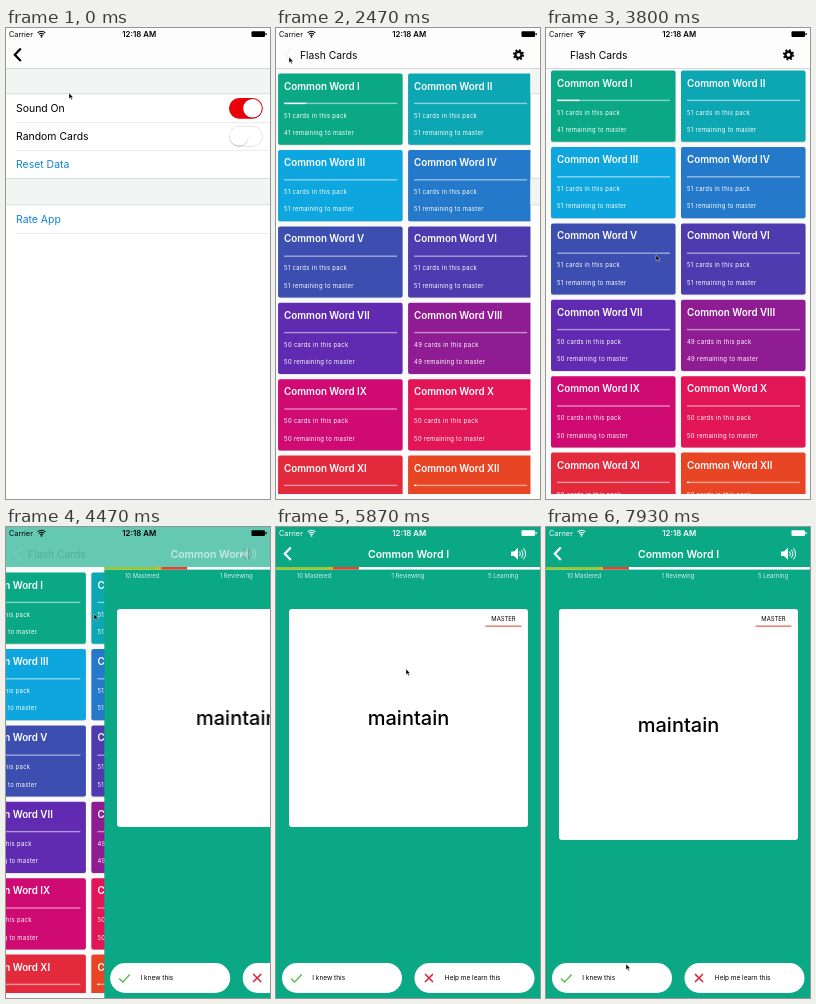
Recreate the animation shown at these times as an HTML page. Size 264 by 471 pixels, loop 8000 ms.

```html
<!DOCTYPE html>
<html lang="en">
<head>
<meta charset="utf-8">
<title>Flash cards</title>
<style>
html, body { margin: 0; width: 100%; height: 100%; overflow: hidden; background: #fff; }
#stage { position: relative; width: 264px; height: 471px; overflow: hidden; }
#stage svg { display: block; font-family: Inter, "Open Sans", sans-serif; }
.layer { position: absolute; left: 0; top: 0; width: 264px; height: 471px; }
#flip { perspective: 784px; perspective-origin: 132px 239px; }
.card { position: absolute; left: 12.5px; top: 82px; width: 239px; background: #fff; border-radius: 3px; overflow: hidden; }
.serif { font-family: "Liberation Serif", "Noto Serif", serif; }
</style>
</head>
<body>
<div id="stage">
  <svg class="layer" id="list"></svg>
  <svg class="layer" id="settings"></svg>
  <div class="layer" id="detail">
    <svg class="layer" id="study"></svg>
    <div class="layer" id="flip">
      <div class="card" id="front"><svg id="frontArt" width="239" height="231"></svg></div>
      <div class="card" id="back" style="height:67.5px"><svg id="backArt" width="239" height="68"></svg></div>
    </div>
  </div>
  <svg class="layer" id="nav"></svg>
  <svg class="layer" id="pointer"></svg>
</div>
<script>
const $ = id => document.getElementById(id);
const LOOP = 8000, GREEN = [11, 168, 134];

// Markup helpers; text is placed by its left (or anchor) and cap-height centre.
const text = (x, y, size, str, attrs = '') =>
  `<text x="${x}" y="${y + size * .364}" font-size="${size}" ${attrs}>${str}</text>`;
const rect = (x, y, w, h, fill, attrs = '') =>
  `<rect x="${x}" y="${y}" width="${w}" height="${h}" fill="${fill}" ${attrs}/>`;
const line = (d, color, width, attrs = '') =>
  `<path d="${d}" fill="none" stroke="${color}" stroke-width="${width}" ${attrs}/>`;
const MID = 'text-anchor="middle"';

function buildList() {
  const packs = [
    ['I', 51, 10, '#0ba886'], ['II', 51, 0, '#0ca7b3'], ['III', 51, 0, '#0ea6de'], ['IV', 51, 0, '#2579cb'],
    ['V', 51, 0, '#3c4eb0'], ['VI', 51, 0, '#4e3bb0'], ['VII', 50, 0, '#602bb0'], ['VIII', 49, 0, '#901c94'],
    ['IX', 50, 0, '#cf0a72'], ['X', 50, 0, '#e21556'], ['XI', 50, 0, '#e32a3c'], ['XII', 50, 1, '#e84524']
  ];
  const small = 'fill="#fff" letter-spacing=".31"';
  const cards = packs.map(([num, total, done, color], i) => {
    const x = i % 2 ? 135 : 5, y = 45.6 + 76.4 * (i >> 1);
    return rect(x, y + .6, 124.5, 71.2, '#000', 'rx="2" opacity=".15"') +
      rect(x, y, 124.5, 71.2, color, 'rx="2"') +
      text(x + 6, y + 12.4, 9.8, 'Common Word ' + num, 'font-weight="600" fill="#fff"') +
      rect(x + 6, y + 29.1, 113, 1.4, '#fff', 'opacity=".5"') +
      rect(x + 6, y + 29.1, 113 * done / total, 1.4, '#fff') +
      text(x + 6, y + 41.9, 5.9, total + ' cards in this pack', small) +
      text(x + 6, y + 59.3, 5.9, total - done + ' remaining to master', small);
  });
  $('list').innerHTML = rect(0, 40, 264, 431, '#fafafa') + `<g id="packs">${cards.join('')}</g>` +
    rect(0, 466, 264, 5, '#fafafa');
}

function toggle(y, id) {
  return rect(223.5, y - 10, 33, 20, '#fff', 'rx="10" stroke="#e4e4e4"') +
    rect(223, y - 10.4, 33.8, 20.8, '#ea0008', `rx="10.4" id="${id}Fill"`) +
    `<g id="${id}Knob"><circle cy="${y + 1}" r="9.4" opacity=".18"/><circle cy="${y}" r="9.3" fill="#fff"/></g>`;
}

function buildSettings() {
  const rule = (y, x = 10) => rect(x, y, 264 - x, .7, x ? '#e6e6e8' : '#cfcfd2');
  const label = (y, str, fill = '#000') => text(10, y, 10.45, str, `fill="${fill}"`);
  $('settings').innerHTML = rect(0, 40, 264, 431, '#fff') +
    rect(0, 40, 264, 26, '#f3f5f5') + rect(0, 150.5, 264, 26, '#f3f5f5') +
    rule(65.5, 0) + rule(94) + rule(122) + rule(150.3, 0) + rule(176.5, 0) + rule(205) +
    label(80, 'Sound On') + label(108, 'Random Cards') +
    label(136.5, 'Reset Data', '#1283d8') + label(191, 'Rate App', '#1283d8') +
    toggle(80.3, 'sound') + toggle(108.3, 'random');
}

function buildDetail() {
  const stat = (x, str) => text(x, 49, 6, str, `${MID} fill="#fff" opacity=".8"`);
  const button = (x, icon, str) => rect(x, 436, 120, 30, '#fff', 'rx="15"') + icon +
    text(x + 30.3, 451, 6.5, str);
  $('study').innerHTML = rect(0, 40, 264, 431, `rgb(${GREEN})`) +
    rect(0, 40, 264, 2.6, '#fff') + rect(0, 40, 57, 2.6, '#9ac531') +
    rect(52, 40, 5, 2.6, '#d6b72b') + rect(57, 40, 26, 2.6, '#e0452f') +
    stat(38, '10 Mastered') + stat(132, '1 Reviewing') + stat(227, '5 Learning') +
    button(6, line('M15 451.5l3.6 3.6 7-7.6', '#58b947', 1.4), 'I knew this') +
    button(138.5, line('M149 447l8 8m0-8l-8 8', '#d92440', 1.6), 'Help me learn this');

  const badge = (y, color) => text(214.5, y, 5.9, 'MASTER', MID) + rect(196.5, y + 6.5, 36, 1.4, color);
  $('frontArt').innerHTML = badge(10, '#ea7468') + `<g id="word">${text(119.5, 0, 20, 'maintain', MID + ' font-weight="500"')}</g>`;
  const serif = (y, str) => text(6.8, y, 7.7, str, 'class="serif"');
  $('backArt').innerHTML = badge(7.5, '#c9a24a') + text(6, 14.5, 10.4, 'maintain', 'font-weight="600"') +
    serif(33.5, '<tspan font-weight="700">verb:</tspan> to assert') +
    serif(46.5, 'The scientist <tspan font-weight="700">maintained</tspan> that the extinction of dinosaurs was most likely') +
    serif(56.5, 'brought about by a drastic change in climate.');
}

function buildNav() {
  const ring = 1.846;
  const chevron = id => line('M14.8 20.5L8.8 26.8l6 6.3', 'currentColor', 2.2, `id="${id}"`);
  const wave = r => `M${35.5 - r * .72} ${8.8 - r * .72}a${r} ${r} 0 0 1 ${r * 1.44} 0`;
  $('nav').innerHTML = rect(0, 0, 264, 40, '#fff', 'id="bar"') + rect(0, 40, 264, .7, '#c9c9cc', 'id="barRule"') +
    `<g id="status">${text(3, 6.2, 7.3, 'Carrier')}${text(133.2, 6.2, 7.8, '12:18 AM', MID + ' font-weight="600"')}
      ${[1.6, 3.5, 5.4].map(r => line(wave(r), 'currentColor', 1.1)).join('')}<circle cx="35.5" cy="8.9" r=".8"/>
      ${rect(245.5, 3.2, 13.5, 5.8, 'currentColor', 'rx="1"')}${rect(259.5, 5, 1.2, 2.2, 'currentColor')}</g>
    ${chevron('backDark')}
    <g id="listNav">${text(24, 27, 10.3, 'Flash Cards')}
      <circle cx="242.5" cy="26.8" r="4.7" fill="none" stroke="#000" stroke-width="1.9" stroke-dasharray="${ring}"/>
      <circle cx="242.5" cy="26.8" r="3.1" fill="none" stroke="#000" stroke-width="2.4"/></g>
    <g color="#fff" fill="#fff">${chevron('backLight')}
      <clipPath id="titleArea"><path d="M30 14h206v26H30z"/></clipPath>
      <g clip-path="url(#titleArea)"><g id="title">${text(132.5, 27, 10.5, 'Common Word I', MID + ' font-weight="600"')}</g></g>
      <g id="speaker"><path d="M235 24.5h3l4-3.7v12l-4-3.7h-3z"/>
      ${line('M243.6 24.5q1.6 2.3 0 4.6M245.5 22.8q3 4 0 8M247.5 21.2q4.2 5.6 0 11.2', '#fff', 1)}</g></g>`;
  $('pointer').innerHTML = '<path id="arrow" d="M0 0v5.8l1.4-1.2 1 2.2 1-.5-1-2.1h1.8z" stroke="#fff" stroke-width=".4"/>';
}

buildList();
buildSettings();
buildDetail();
buildNav();

const clamp = v => Math.min(1, Math.max(0, v));
const span = (t, start, length) => clamp((t - start) / length);
const smooth = p => p * p * (3 - 2 * p);
const easeOut = p => 1 - (1 - p) ** 4;
const mix = (a, b, p) => a + (b - a) * p;

// Pointer stops: time, x, y
const stops = [
  [70, 63, 65], [820, 234, 106], [1150, 234, 106], [1730, 13, 29], [2850, 13, 29],
  [3200, 110, 230], [3250, 110, 230], [3500, 110, 200], [3600, 110, 200], [3850, 110, 230],
  [4220, 88, 87], [5000, 88, 87], [5650, 130, 142], [7400, 130, 142], [7900, 80, 437]
];
function pointerAt(t) {
  let i = 0;
  while (i < stops.length - 2 && t > stops[i + 1][0]) i++;
  const [a, b] = [stops[i], stops[i + 1]], p = smooth(span(t, a[0], b[0] - a[0]));
  return [mix(a[1], b[1], p), mix(a[2], b[2], p)];
}

const shift = (id, x, y = 0) => $(id).setAttribute('transform', `translate(${x} ${y})`);
const slide = (id, x) => $(id).style.transform = `translateX(${x}px)`;
const fade = (id, v) => $(id).style.opacity = v;

function setToggle(id, on) {
  shift(id + 'Knob', mix(233, 246.5, on));
  fade(id + 'Fill', on);
}

function turn(id, degrees) {
  const s = Math.abs(Math.sin(degrees * Math.PI / 180)), style = $(id).style;
  style.visibility = Math.abs(degrees) < 90 ? 'visible' : 'hidden';
  style.transform = `translateZ(${-119.5 * s}px) rotateY(${degrees}deg)`;
  style.filter = s > .001 ? `brightness(${1 - .55 * s})` : 'none';
}

function draw(t) {
  const pop = easeOut(span(t, 2190, 500)), push = easeOut(span(t, 4340, 598));

  setToggle('sound', 1);
  setToggle('random', smooth(span(t, 920, 230)));
  slide('settings', 264 * pop);
  slide('list', -79 * (1 - pop + push));
  slide('detail', 264 * (1 - push));
  shift('packs', 0, -30 * (smooth(span(t, 3250, 250)) - smooth(span(t, 3600, 250))));

  $('bar').setAttribute('fill', `rgb(${GREEN.map(c => Math.round(mix(253, c, push)))})`);
  fade('barRule', push > 0 ? 0 : 1);
  const ink = push > .85 ? '#fff' : '#000';
  $('status').setAttribute('fill', ink);
  $('status').setAttribute('color', ink);
  fade('backDark', 1 - pop);
  fade('listNav', pop * (1 - push) ** 2);
  shift('listNav', -3 * push);
  fade('title', push);
  fade('speaker', push * push);
  fade('backLight', push ** 6);
  shift('title', 195 * (1 - push));

  const angle = 180 * (span(t, 6000, 470) - span(t, 6800, 490));
  const height = t < 6400 ? 218 : 231;
  $('front').style.height = height + 'px';
  shift('word', 0, height / 2);
  turn('front', -angle);
  turn('back', 180 - angle);

  shift('arrow', ...pointerAt(t));
}

const begin = performance.now();
function tick() {
  draw((performance.now() - begin) % LOOP);
  requestAnimationFrame(tick);
}
tick();
</script>
</body>
</html>
```
